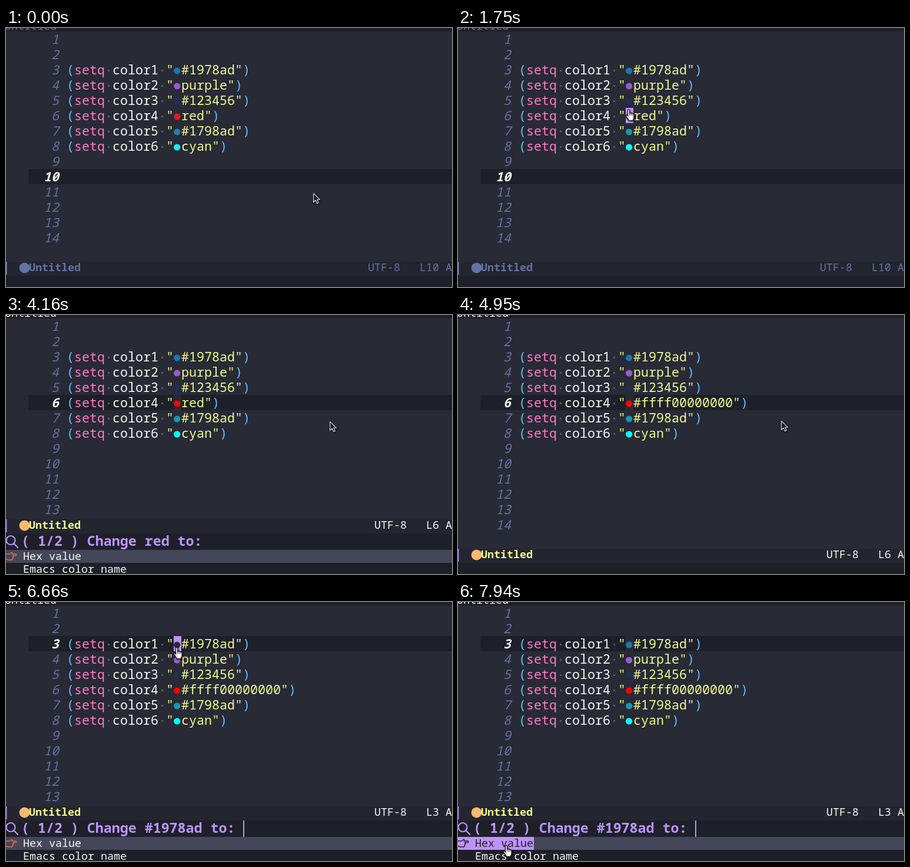
An HTML page with a canvas for the animation above (8 s loop, 758 by 441 pixels).

```html
<!DOCTYPE html>
<html lang="en">
<head>
<meta charset="utf-8">
<title>Color editing in a text editor</title>
<style>
  html, body { margin: 0; width: 758px; height: 441px; overflow: hidden; background: #282a36; }
  canvas { display: block; }
</style>
</head>
<body>
<canvas id="stage" width="758" height="441"></canvas>
<script>
const ctx = document.getElementById('stage').getContext('2d');
const W = 758, H = 441, LOOP = 8000;
const CELL = 13, ROW = 26, CODE_X = 103, DOT_X = 285;
const C = {
  bg: '#282a36', dark: '#1e2029', bar: '#23252f', select: '#44475a',
  text: '#f8f8f2', muted: '#6272a4', pink: '#ff79c6', yellow: '#f1fa8c',
  purple: '#bd93f9', blue: '#61bfff', orange: '#ffb86c', pointer: '#e0694f', space: '#565863'
};
const MONO = '"Noto Sans Mono", "DejaVu Sans Mono", monospace';
const FONT = {
  code: `21.667px ${MONO}`,
  number: `italic 21.667px ${MONO}`,
  current: `italic bold 21.667px ${MONO}`,
  small: `18.333px ${MONO}`,
  smallBold: `bold 18.333px ${MONO}`,
  prompt: `bold 23.3px ${MONO}`
};

// Mouse legs: start, end, number of steps, target x, target y
const HOME = [522, 281];
const LEGS = [
  [100, 820, 8, 290, 196],
  [920, 1020, 2, 290, 199],
  [1350, 1750, 5, 290, 138],
  [3250, 3360, 2, 550, 181],
  [4950, 5750, 9, 281, 57],
  [5850, 6050, 3, 290, 77],
  [7060, 7160, 2, 183, 346],
  [7330, 7940, 7, 82, 414]
];

// The last entry whose time has come
const at = (steps, t) => steps.filter(s => t >= s[0]).pop()[1];
const FOCUS = [[0, false], [2150, true]];
const POINT = [[0, 10], [2250, 6], [6450, 3]];
const PROMPT = [[0, ''], [2750, 'red'], [4340, ''], [6660, '#1978ad']];
const CARET = [[0, true], [3250, false], [3760, true], [4160, false], [6660, true], [7160, false], [7660, true]];
const COLOR4 = [[0, 'red'], [4440, '#ffff00000000']];

const ease = u => u < .5 ? 4 * u ** 3 : 1 - 4 * (1 - u) ** 3;
const rowTop = line => ROW * line - 20;

function mouseAt(t) {
  let [x, y] = HOME;
  for (const [start, end, count, tx, ty] of LEGS) {
    if (t < start) break;
    const gap = (end - start) / (count - 1);
    const step = Math.min(count, Math.floor((t - start) / gap + 1e-6) + 1);
    const u = ease(step / count);
    x += (tx - x) * u;
    y += (ty - y) * u;
  }
  return [Math.round(x), Math.round(y)];
}

function rect(x, y, w, h, color) {
  ctx.fillStyle = color;
  ctx.fillRect(x, y, w, h);
}

function disc(x, y, r, color) {
  ctx.fillStyle = color;
  ctx.beginPath();
  ctx.arc(x, y, r, 0, 7);
  ctx.fill();
}

function text(str, x, y, font, color, align = 'left') {
  ctx.font = font;
  ctx.fillStyle = color;
  ctx.textAlign = align;
  ctx.fillText(str, x, y);
}

function shape(x, y, path, fill, stroke, width) {
  ctx.save();
  ctx.translate(x, y);
  ctx.lineWidth = width;
  ctx.lineJoin = ctx.lineCap = 'round';
  if (fill) {
    ctx.fillStyle = fill;
    ctx.fill(path);
  }
  ctx.strokeStyle = stroke;
  ctx.stroke(path);
  ctx.restore();
}

const ARROW = new Path2D('M.7 .7V15.5L4.2 12.2L6.8 17.8L9.3 16.6L6.8 11.2H11.3Z');
const HAND = new Path2D('M-1.6 1.4Q0 -.4 1.6 1.4V7Q3 5.8 4.3 7.2Q5.6 6.2 6.8 7.8Q8.6 7.2 9 9.4V14.5Q9 16.8 7.6 18V19.6H-.2V18L-4.6 12.2Q-5 9.6-3.2 10L-1.6 11.6Z');
const KNUCKLES = new Path2D('M1.6 7V10.5M4.3 7.4V10.5M6.8 8V10.5');
const POINTER = new Path2D('M0 5H6L10 2Q11.5 3 10 5H17Q18.5 6.2 17 7.5H11.5M11.5 7.5H13Q13.5 9.5 11.5 10Q13 12 11 12.5Q11.5 15 9 15H4L0 13.5');
const LENS = new Path2D('M15.5 383.5A7.5 7.5 0 1 1 .5 383.5A7.5 7.5 0 1 1 15.5 383.5M13.5 389L20 396');

function codeLine(line, name, value, color, state) {
  const top = rowTop(line), base = top + 21;
  const put = (str, col, tint) => text(str, CODE_X + col * CELL, base, FONT.code, tint);
  put('(', 0, C.blue);
  put('setq', 1, C.pink);
  put(name, 6, C.text);
  for (const col of [5, 12]) rect(CODE_X + col * CELL + 5, top + 13, 3, 3, C.space);
  put('"', 13, C.yellow);

  const hover = state.hoverLine === line;
  if (hover) rect(DOT_X, top, CELL, ROW, C.purple);
  else if (state.point === line) rect(DOT_X, top, CELL, ROW, C.bg);
  disc(DOT_X + 5.7, top + 15, 5.6, hover ? C.bg : color);

  put(value + '"', 15, C.yellow);
  put(')', 16 + value.length, C.blue);
}

function modeLine(y, state) {
  const on = state.focus;
  rect(0, y, W, 24, C.bar);
  rect(0, y, 1.3, 22, on ? C.purple : '#8d93d6');
  disc(31.5, y + 10.5, 9, on ? C.orange : C.muted);
  text('Untitled', 39, y + 16, FONT.smallBold, on ? C.yellow : C.muted);
  text(`UTF-8   L${state.point} A`, W, y + 16, FONT.small, on ? C.text : C.muted, 'right');
}

function minibuffer(state) {
  rect(0, 372, W, H - 372, C.dark);
  shape(0, 0, LENS, null, C.purple, 2.2);
  const prompt = `( 1/2 ) Change ${state.prompt} to: `;
  text(prompt, 26, 393, FONT.prompt, C.purple);
  if (state.caret) rect(26 + Math.round(prompt.length * 13.96), 372, 2, 28, C.purple);

  rect(0, 400, W, 22, C.select);
  if (state.hoverItem) rect(0, 400, 129, 22, C.purple);
  shape(0, 402, POINTER, null, state.hoverItem ? C.dark : C.pointer, 1.5);
  text('Hex value', 29, 416.5, FONT.small, state.hoverItem ? C.dark : C.text);
  text('Emacs color name', 29, 438.5, FONT.small, C.text);
}

function drawMouse([x, y], hand) {
  ctx.save();
  ctx.shadowColor = 'rgba(0,0,0,.45)';
  ctx.shadowBlur = 3;
  ctx.shadowOffsetX = ctx.shadowOffsetY = 1.5;
  if (hand) shape(x, y, HAND, '#fff', '#111', 1.1);
  else shape(x, y, ARROW, '#20182c', '#e4e0ea', 1.1);
  ctx.restore();
  if (hand) shape(x, y, KNUCKLES, null, '#222', .9);
}

function draw(t) {
  const mouse = mouseAt(t), [mx, my] = mouse;
  const state = {
    focus: at(FOCUS, t), point: at(POINT, t), prompt: at(PROMPT, t), caret: at(CARET, t)
  };
  const line = Math.floor((my + 20) / ROW);
  state.hoverLine = mx >= DOT_X && mx < DOT_X + CELL && line >= 3 && line <= 8 ? line : 0;
  state.hoverItem = !!state.prompt && my >= 400 && my < 422 && mx < 129;

  rect(0, 0, W, H, C.bg);
  rect(0, 0, W, 6, C.dark);
  text('Untitled', -2, 2.5, FONT.small, state.focus ? C.text : C.muted);
  rect(38, rowTop(state.point), W - 38, ROW, C.dark);
  for (let n = 1; n <= 14; n++) {
    const here = n === state.point;
    text(n, 90, rowTop(n) + 21, here ? FONT.current : FONT.number, here ? C.text : C.muted, 'right');
  }

  const lively = t >= 1350;
  const rows = [
    ['#1978ad', '#1978ad'],
    ['purple', '#9b59d0'],
    ['#123456', '#1c3352'],
    [at(COLOR4, t), lively ? '#fa0000' : '#e61a1a'],
    ['#1798ad', lively ? '#1798ad' : '#1f7fae'],
    ['cyan', lively ? '#00ffff' : '#10f0ff']
  ];
  rows.forEach(([value, color], i) => codeLine(i + 3, 'color' + (i + 1), value, color, state));

  if (state.prompt) {
    modeLine(348, state);
    minibuffer(state);
  } else {
    modeLine(398, state);
    rect(0, 422, W, H - 422, C.dark);
  }
  drawMouse(mouse, state.hoverLine || state.hoverItem);
}

const begin = performance.now();
function frame() {
  draw((performance.now() - begin) % LOOP);
  requestAnimationFrame(frame);
}
frame();
</script>
</body>
</html>
```
